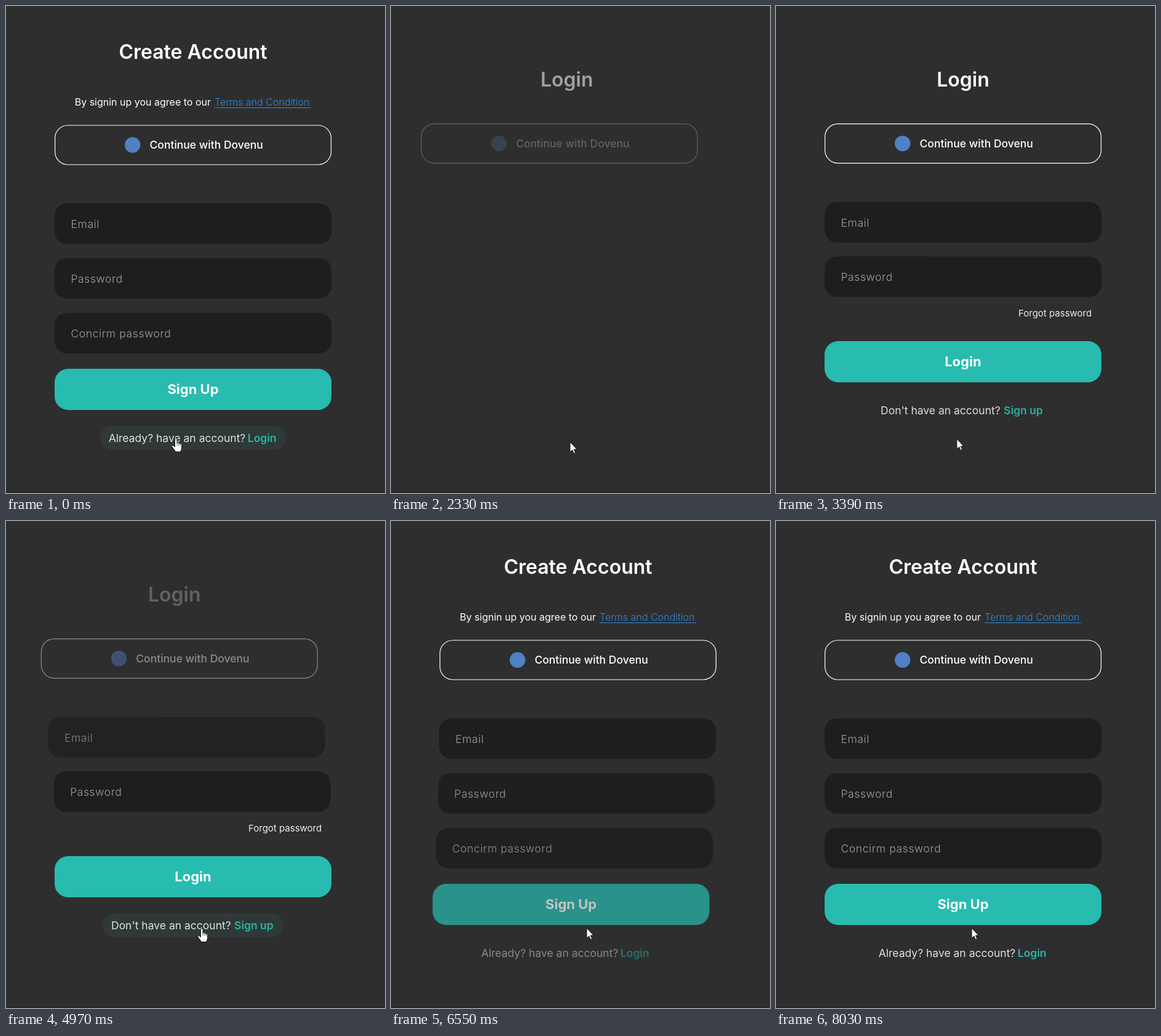
An HTML page for the animation above (8060 ms loop, 616 by 792 pixels).

```html
<!DOCTYPE html>
<html lang="en">
<head>
<meta charset="utf-8">
<title>Account forms</title>
<style>
html, body { margin: 0; width: 100%; height: 100%; overflow: hidden; background: #2e2e2e; }
svg { display: block; width: 616px; height: 792px; font: 400 17.5px Inter, sans-serif; font-optical-sizing: none; fill: #fff; }
.title { font-size: 32px; font-weight: 600; text-anchor: middle; }
.terms { font-size: 16px; }
.terms .link { fill: #2b8ae0; font-weight: 300; }
.provider { font-weight: 500; }
.field { fill: #1e1e1e; }
.hint { fill: #a0a0a0; font-weight: 300; letter-spacing: .6px; }
.forgot { font-size: 15px; fill: #ececec; }
.button { fill: #28bbb0; }
.label { font-size: 22px; font-weight: 700; text-anchor: middle; }
.ask { fill: #e2e2e2; }
.ask tspan { fill: #28b5a9; font-weight: 600; }
.pill { fill: #28bbb0; fill-opacity: .075; }
.cursor { stroke: #111; stroke-width: 1; stroke-linejoin: round; }
</style>
</head>
<body>
<svg viewBox="0 0 616 792">
  <rect y="790" width="616" height="2" fill="#282628"/>
  <g id="signup"></g>
  <g id="login"></g>
  <g id="cursor" class="cursor">
    <path id="arrow" d="M0 0V16.5L3.8 13 6.3 18.7 8.8 17.6 6.4 12H11.3Z"/>
    <g id="hand">
      <path d="M-1.6 2.4a1.8 1.8 0 0 1 3.6 0V8a1.6 1.6 0 0 1 2.9 .6 1.6 1.6 0 0 1 2.5 .9 1.5 1.5 0 0 1 2.3 1.4V15.500c0 3-1.500 4-1.700 7H-.6c-.5-2.500-4-5-5.500-8.500-.6-1.800 1.200-2.400 2.300-1.300l2.200 2Z"/>
      <path d="M2 8v4M4.900 8.800v3.400M7.400 9.700v2.800" stroke-width=".8" fill="none"/>
    </g>
  </g>
</svg>
<script>
const LOOP = 8060, SHIFT = 40;
const $ = id => document.getElementById(id);

const box = (cls, y, h, r) => `<rect class="${cls}" x="79" y="${y}" width="450" height="${h}" rx="${r}"/>`;
const text = (cls, x, y, s) => `<text class="${cls}" x="${x}" y="${y}">${s}</text>`;
const title = (y, s) => text("title", 304, y, s);
const provider = y =>
  `<rect x="79.600" y="${y}" width="448.800" height="64" rx="21" fill="none" stroke="#fff" stroke-width="1.200"/>` +
  `<circle cx="205.700" cy="${y + 32}" r="12.700" fill="#4f81c4"/>` +
  text("provider", 233.5, y + 38.3, "Continue with Dovenu");
const field = (y, s) => box("field", y, 66, 20) + text("hint", 105.5, y + 40, s);
const button = (y, s) => box("button", y, 67, 22) + text("label", 304, y + 41, s);
const ask = (x, y, w, textX, s, linkX, link) =>
  `<rect class="pill" x="${x}" y="${y}" width="${w}" height="39" rx="19.500"/>` +
  text("ask", textX, y + 26, `${s} <tspan x="${linkX}">${link}</tspan>`);

function build(id, parts) {
  $(id).innerHTML = parts.map(p => `<g>${p}</g>`).join("");
  return [...$(id).children];
}

const signup = build("signup", [
  title(85.5, "Create Account"),
  `<g class="terms">${text("", 111.7, 162, "By signin up you agree to our")}${text("link", 339, 162, "Terms and Condition")}` +
    `<rect x="339" y="165" width="157" height="1" fill="#2b8ae0"/></g>`,
  provider(194),
  field(321, "Email"),
  field(410, "Password"),
  field(499, "Concirm password"),
  button(590, "Sign Up"),
  ask(152, 683, 304, 166.7, "Already? have an account?", 392.8, "Login")
]);
const login = build("login", [
  title(130.5, "Login"),
  provider(191.6),
  field(318.8, "Email"),
  field(407.2, "Password"),
  text("forgot", 394, 505, "Forgot password"),
  button(545, "Login"),
  ask(157, 638, 294, 171, "Don't have an account?", 371, "Sign up")
]);
const signupPill = $("signup").querySelector(".pill");
const loginPill = $("login").querySelector(".pill");

const clamp = u => Math.min(1, Math.max(0, u));
const smooth = u => (u = clamp(u), u * u * (3 - 2 * u));
const bezier = (a, b, s) => 3 * a * s * (1 - s) ** 2 + 3 * b * s * s * (1 - s) + s ** 3;

// cubic-bezier(.25, .1, .25, 1)
function ease(u) {
  if (u <= 0 || u >= 1) return clamp(u);
  let lo = 0, hi = 1;
  for (let i = 0; i < 24; i++) {
    const mid = (lo + hi) / 2;
    if (bezier(.25, .25, mid) < u) lo = mid; else hi = mid;
  }
  return bezier(.1, 1, lo);
}

function place(items, shown) {
  items.forEach((el, i) => {
    const p = shown(i);
    el.setAttribute("transform", `translate(${SHIFT * (p - 1)})`);
    el.setAttribute("opacity", p);
  });
}
const enter = (t, start, step) => i => ease((t - start - i * step) / 800);
const leave = (t, start) => i => 1 - ease((t - start - i * 68) / 500);

function draw(t) {
  place(signup, t < 4000 ? leave(t, 1260) : enter(t, 5588, 104));
  place(login, t < 4200 ? enter(t, 2078, 112) : leave(t, 4742));
  signupPill.setAttribute("opacity", t < 4000 ? 1 : 0);
  loginPill.setAttribute("opacity", clamp((t - 3560) / 200));

  const a = smooth((t - 830) / 300), b = smooth((t - 3310) / 400);
  const x = 276 + 15 * a + 27 * b, y = 702.5 + 6.5 * a - 47 * b;
  $("cursor").setAttribute("transform", `translate(${x} ${y})`);
  const pointing = t < 2200 || t > 3560 && t < 5620;
  $("hand").setAttribute("display", pointing ? "inline" : "none");
  $("arrow").setAttribute("display", pointing ? "none" : "inline");
}

const began = performance.now();
function tick() {
  draw((performance.now() - began) % LOOP);
  requestAnimationFrame(tick);
}
tick();
</script>
</body>
</html>
```
